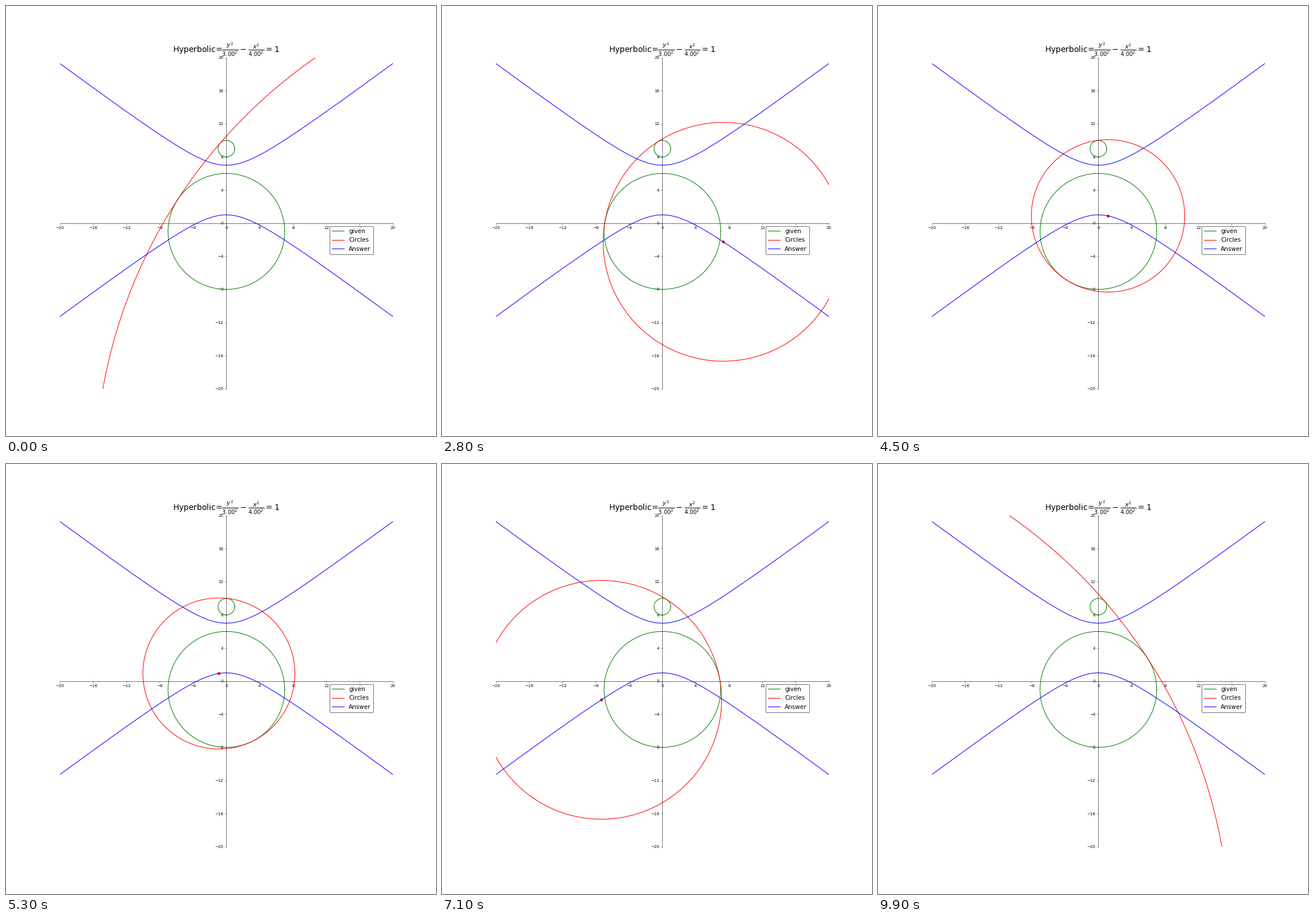
Animation of 748 by 748 pixels, one loop 10 s. Source, as a matplotlib script:

```python
import numpy as np
import matplotlib.pyplot as plt
from matplotlib.animation import FuncAnimation

FRAMES = 100
DPI = 50
A, B, MID = 3.0, 4.0, 4.0    # hyperbola half axes and centre height
BIG = (-1, 7)                # fixed circles on the y axis: centre height, radius
SMALL = (9, 1)

angle = np.linspace(0, 2 * np.pi, 721)


def circle(cx, cy, r):
    return cx + r * np.cos(angle), cy + r * np.sin(angle)


fig, ax = plt.subplots(figsize=(748 / DPI, 748 / DPI), dpi=DPI)
ax.set(xlim=(-20, 20), ylim=(-20, 20),
       xticks=range(-20, 21, 4), yticks=range(-20, 21, 4))
for side in ("left", "bottom"):
    ax.spines[side].set_position(("data", 0))
for side in ("right", "top"):
    ax.spines[side].set_visible(False)

ax.plot(*circle(0, *BIG), "g", label="given")
ax.plot(*circle(0, *SMALL), "g")
ring, = ax.plot([], [], "r", label="Circles")
dot, = ax.plot([], [], "ro")

x = np.linspace(-20, 20, 401)
rise = A * np.sqrt(1 + (x / B) ** 2)
ax.plot(x, MID + rise, "b", label="Answer")
ax.plot(x, MID - rise, "b")

ax.set_title(rf"Hyperbolic=$\frac{{y^2}}{{{A:.2f}^2}}-\frac{{x^2}}{{{B:.2f}^2}}=1$",
             fontsize=20)
ax.legend(loc="upper right", bbox_to_anchor=(0.95, 0.5), fontsize=15,
          edgecolor="black")


def update(i):
    # The centre runs along the lower branch; the ring encloses both circles.
    t = np.pi * (1 - 2 * i / (FRAMES - 1))
    cx, cy = B * np.sinh(t), MID - A * np.cosh(t)
    r = np.hypot(cx, cy - SMALL[0]) + SMALL[1]
    ring.set_data(*circle(cx, cy, r))
    dot.set_data([cx], [cy])
    return ring, dot


anim = FuncAnimation(fig, update, frames=FRAMES, interval=100, repeat=True)
plt.show()
```
